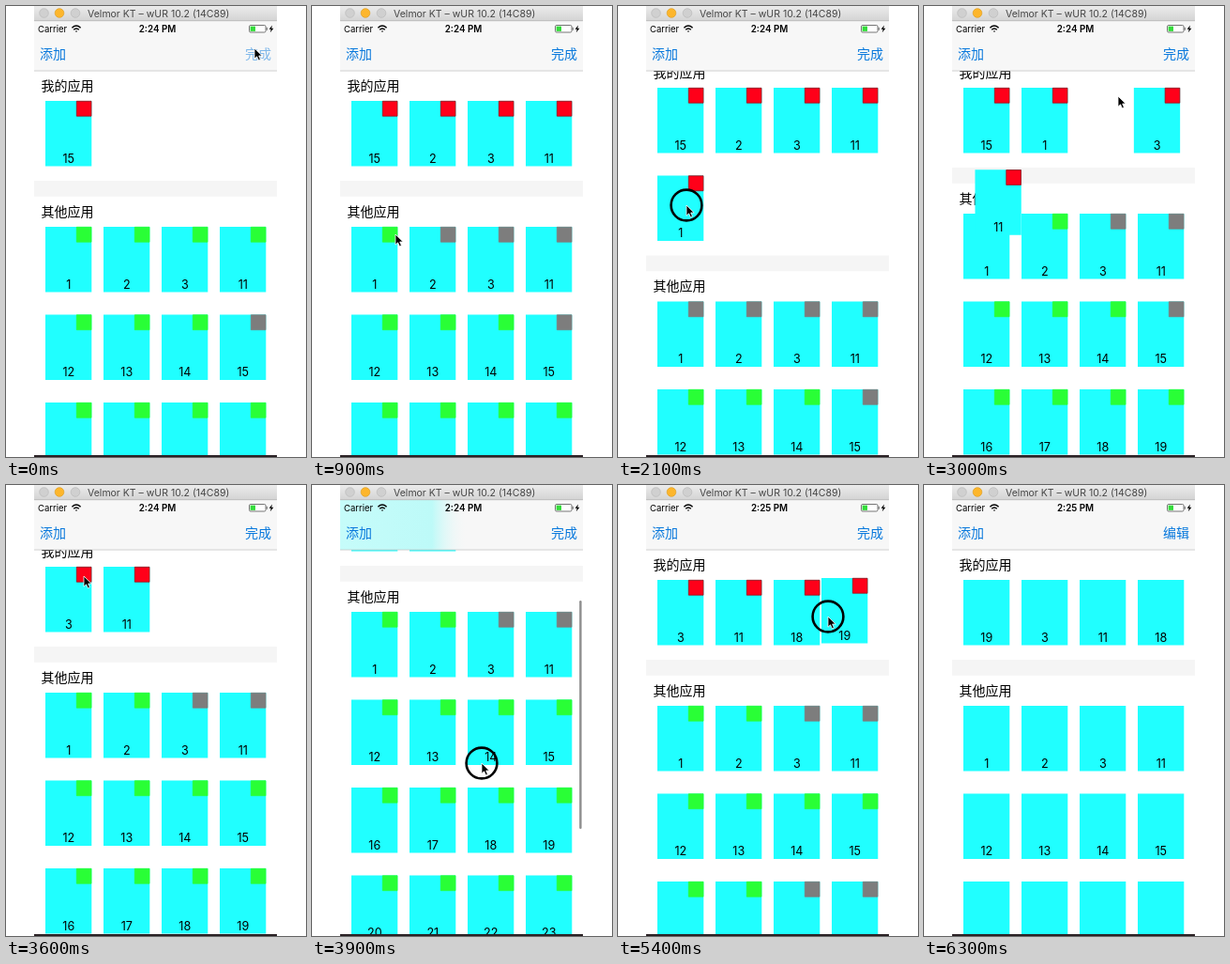
These frames come from a looping animation (320x480 px, 6.6 s). An HTML page:

```html
<!DOCTYPE html>
<html lang="zh-CN">
<head>
<meta charset="utf-8">
<style>
html, body { margin: 0; width: 100%; height: 100%; overflow: hidden; background: #fff; }
svg { display: block; width: 320px; height: 480px; }
text { font-family: Inter, Roboto, sans-serif; }
.cjk { font-family: "Noto Sans CJK SC", "Noto Sans CJK", sans-serif; font-size: 14px; }
.num { font-size: 12.6px; text-anchor: middle; }
.nav { fill: #0878dc; font-weight: 500; }
</style>
</head>
<body>
<svg viewBox="0 0 320 480">
  <defs>
    <linearGradient id="chrome" x2="0" y2="1">
      <stop stop-color="#ebebeb"/><stop offset="1" stop-color="#d3d3d3"/>
    </linearGradient>
    <linearGradient id="tint">
      <stop stop-color="#c6fcfa"/><stop offset=".72" stop-color="#bdfaf8"/>
      <stop offset="1" stop-color="#f7f7f7" stop-opacity="0"/>
    </linearGradient>
    <clipPath id="screen"><path d="M30 69H289V478H30z"/></clipPath>
  </defs>
  <g id="content" clip-path="url(#screen)"></g>
  <path d="M30 16H289V69H30z" fill="#f7f7f7"/>
  <rect id="glow" x="30" y="16" height="53" fill="url(#tint)"/>
  <path d="M30 69H289" stroke="#c4c4c4" stroke-width=".8"/>
  <path d="M30 0H289V16H30z" fill="url(#chrome)"/>
  <path d="M30 15.7H289" stroke="#b4b4b4" stroke-width=".7"/>
  <g stroke-width=".7">
    <circle cx="40.5" cy="7.5" r="4.8" fill="#d0d0d0" stroke="#b9b9b9"/>
    <circle cx="57" cy="7.5" r="4.8" fill="#fdb62c" stroke="#dfa023"/>
    <circle cx="74" cy="7.5" r="4.8" fill="#d0d0d0" stroke="#b9b9b9"/>
  </g>
  <text x="87" y="11.5" font-size="10.5" fill="#454545">Velmor KT – wUR 10.2 (14C89)</text>
  <text x="34" y="28" font-size="9.5">Carrier</text>
  <g fill="none" stroke="#000" stroke-width="1.4">
    <path d="M70.4 23.2Q75 18.8 79.6 23.2M72.2 25.2Q75 22.6 77.8 25.2"/>
    <path d="M73.8 26.4H76.2L75 28z" fill="#000" stroke="none"/>
  </g>
  <text id="clock" x="161.5" y="28" font-size="9.8" font-weight="600" text-anchor="middle"></text>
  <rect x="259.5" y="20.5" width="17.5" height="7.5" rx="1.4" fill="#fff" stroke="#555" stroke-width=".8"/>
  <path d="M260.6 21.6h5.4v5.3h-5.4z" fill="#35dc3c"/>
  <path d="M278.2 22.8v3" stroke="#555"/>
  <path d="M284 20.4l-3.4 4.3h2.1l-.9 3.6 3.6-4.6h-2.2z"/>
  <text class="cjk nav" x="36" y="55.5">添加</text>
  <text class="cjk nav" id="action" x="255" y="55.5"></text>
  <rect id="thumb" x="285.2" width="2.4" rx="1.2" fill="#8e8e8e"/>
  <path d="M30 478H289V480H30z" fill="#2b2225"/>
  <g id="pointer">
    <circle id="ring" r="16.4" fill="none" stroke="#000" stroke-width="2.6"/>
    <path d="M0 0V11.2L2.6 8.8 4.4 12.8 6.4 11.9 4.7 8H8.2z" stroke="#fff" stroke-width=".8"/>
  </g>
</svg>
<script>
const STEP = 300, COUNT = 22;
const COL = 62, ROW = 93.5, TOP = 101;
const RED = '#ff0019', GREEN = '#29ff36', GREY = '#7d7d7d';
const $ = id => document.getElementById(id);
const apps = Array.from({ length: 20 }, (_, i) => i < 3 ? i + 1 : i + 8);

// Each beat lists what changes; mine and scroll carry over.
const beats = [
  { mine: [15], scroll: 0, at: [265, 45], fade: 1 },
  { mine: [15, 2], at: [145, 243] },
  { mine: [15, 2, 3], at: [207, 243] },
  { mine: [15, 2, 3, 11], at: [89, 243] },
  { mine: [15, 2, 3, 11, 1], at: [98, 236] },
  { scroll: 23, at: [122, 196], down: 1, bar: 1 },
  { scroll: 18, at: [118, 201], down: 1, bar: 1 },
  { scroll: 14, at: [73, 212], down: 1 },
  { mine: [15, 1, 2, 3, 11], at: [139, 128], down: 1, drag: 1, grip: [31, 32] },
  { at: [187, 108] },
  { mine: [15, 1, 3, 11], from: [15, 1, 2, 3, 11], part: .067, at: [207, 96] },
  { mine: [15, 3, 11], at: [145, 97] },
  { mine: [3, 11], at: [83, 97] },
  { scroll: 100, at: [181, 296], down: 1, bar: 1 },
  { scroll: 112, at: [198, 312] },
  { mine: [3, 11, 18], at: [207, 318] },
  { mine: [3, 11, 18, 19], scroll: 40, at: [190, 290], down: 1, bar: 1 },
  { scroll: 0, at: [235, 142] },
  { at: [224, 140], down: 1, drag: 19, grip: [7, 41] },
  { mine: [19, 3, 11, 18], at: [55, 140], down: 1, drag: 19, grip: [7, 41] },
  { at: [265, 46] },
  { done: 1 }
];
let kept = {};
const states = beats.map(b => {
  kept = { mine: b.mine || kept.mine, scroll: b.scroll ?? kept.scroll };
  return { ...b, ...kept };
});

const slot = i => [42 + i % 4 * COL, Math.floor(i / 4) * ROW];

function tile(id, x, y, badge) {
  const edge = badge === RED ? '#9c1018' : badge;
  return `<g transform="translate(${x} ${y})">
    <path d="M0 0H49.3V69.5H0z" fill="#20ffff"/>` +
    (badge ? `<path d="M33.3 .3H49V16.2H33.3z" fill="${badge}" stroke="${edge}" stroke-width=".8"/>` : '') +
    `<text class="num" x="24.8" y="65.8">${id}</text></g>`;
}

const header = (label, y) => `<text class="cjk" x="37.5" y="${y}">${label}</text>`;

function content(s) {
  const { mine, scroll, done } = s;
  const top = TOP - scroll;
  const base = top + Math.ceil(mine.length / 4) * ROW;
  let out = `<path d="M30 ${base - 8.5}h259v16.7h-259z" fill="#f5f5f5"/>` +
    header('我的应用', top - 11.5) + header('其他应用', base + 29);

  apps.forEach((id, i) => {
    const [x, y] = slot(i);
    out += tile(id, x, base + 40.5 + y, done ? '' : mine.includes(id) ? GREY : GREEN);
  });

  let lifted = '';
  mine.forEach((id, i) => {
    let [x, y] = slot(i);
    if (s.from) {
      const [px, py] = slot(s.from.indexOf(id));
      x = px + (x - px) * s.part;
      y = py + (y - py) * s.part;
    }
    y += top;
    if (id === s.drag) lifted = tile(id, s.at[0] - s.grip[0], s.at[1] - s.grip[1], RED);
    else out += tile(id, x, y, done ? '' : RED);
  });
  return out + lifted;
}

const show = (el, on) => el.setAttribute('visibility', on ? 'visible' : 'hidden');

function draw(k) {
  const s = states[k], rows = Math.ceil(s.mine.length / 4);
  $('content').innerHTML = content(s);
  $('clock').textContent = k < 17 ? '2:24 PM' : '2:25 PM';
  $('action').textContent = s.done ? '编辑' : '完成';
  $('action').setAttribute('opacity', s.fade ? .5 : 1);

  $('glow').setAttribute('width', Math.min(259, 12 + COL * s.mine.length));
  $('glow').setAttribute('opacity', Math.max(0, Math.min(1, (s.scroll - 35) / 60)));

  $('thumb').setAttribute('y', 69 + s.scroll * .54);
  $('thumb').setAttribute('height', rows > 1 ? 216 : 243);
  show($('thumb'), s.bar);

  show($('pointer'), s.at);
  show($('ring'), s.at && s.down);
  if (s.at) $('pointer').setAttribute('transform', `translate(${s.at})`);
}

let last = -1;
function loop() {
  const k = Math.floor(performance.now() / STEP) % COUNT;
  if (k !== last) draw(last = k);
  requestAnimationFrame(loop);
}
loop();
</script>
</body>
</html>
```
